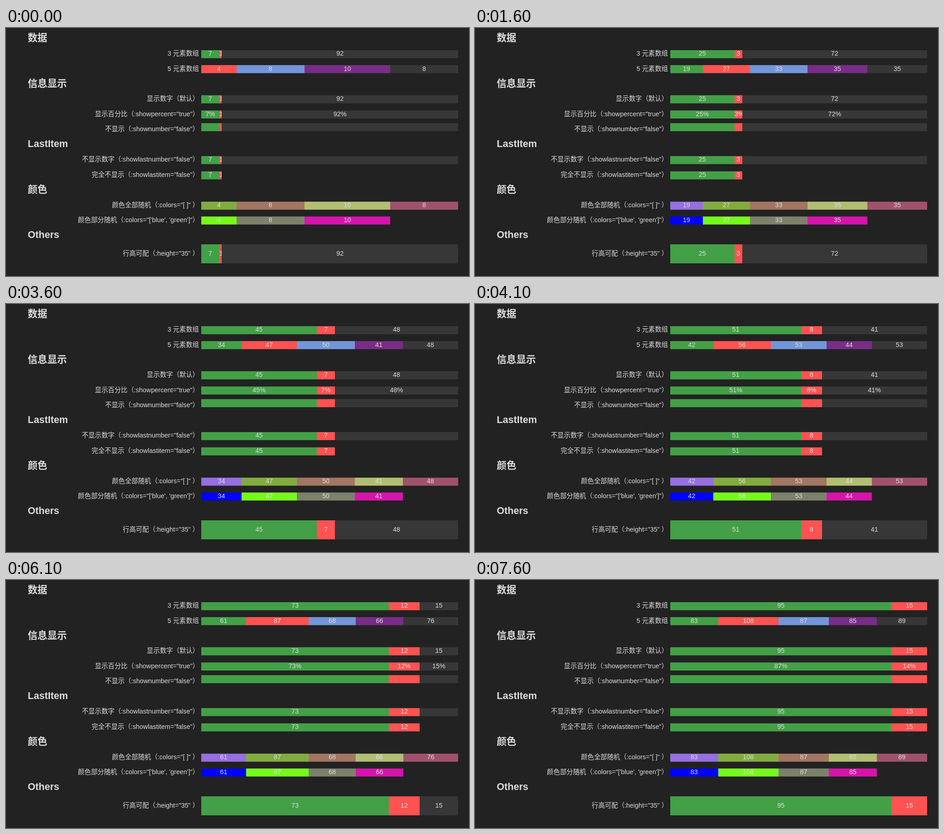
Recreate the animation shown at these times as an HTML page. Size 1022 by 548 pixels, loop 8000 ms.

```html
<!DOCTYPE html>
<html lang="zh-CN">
<head>
<meta charset="utf-8">
<title>Progress bars</title>
<style>
html, body { margin: 0; width: 100%; height: 100%; overflow: hidden; background: #222; }
#stage { display: block; }
.cell { overflow: hidden; }
text { font: 14.4px "Liberation Sans", Arial, "Noto Sans CJK SC", "Noto Sans CJK", sans-serif; fill: #ddd; white-space: pre; }
.head { font-size: 21.6px; font-weight: bold; }
.label { text-anchor: end; }
</style>
</head>
<body>
<svg id="stage" width="1022" height="548" viewBox="0 0 1022 548">
  <rect width="1022" height="548" fill="#222"/>
</svg>
<script>
const NS = "http://www.w3.org/2000/svg";
const LEFT = 431, WIDTH = 567, EM = 14.4, LOOP = 8000;
const stage = document.getElementById("stage");

const GREY = "#373737";
const BASE = ["#43a047", "#ff5252", "#7296d8", "#782d86"];
const RANDOM = ["#966fe0", "#82ab3f", "#a27663", "#b2be72", "#a0526d"];
const MIXED = ["#0000ff", "#76fa1e", "#7c816b", "#d515aa"];

const heads = [["数据", 29], ["信息显示", 130], ["LastItem", 263], ["颜色", 364], ["Others", 464]];

// y: top of the bar; base: text baseline
const rows = [
  { label: "3 元素数组", y: 49, base: 61 },
  { label: "5 元素数组", y: 82, base: 95, five: true },
  { label: "显示数字（默认）", y: 148.6, base: 161 },
  { label: '显示百分比（:showpercent="true"）', y: 182.3, base: 195, percent: true },
  { label: '不显示（:shownumber="false"）', y: 210.2, base: 228, noText: true },
  { label: '不显示数字（:showlastnumber="false"）', y: 283, base: 295, noLastText: true },
  { label: '完全不显示（:showlastitem="false"）', y: 316.8, base: 329, noLast: true },
  { label: '颜色全部随机（:colors="[ ]" ）', y: 383.8, base: 396, five: true, colors: RANDOM },
  { label: "颜色部分随机（:colors=\"['blue', 'green']\"）", y: 416.5, base: 429, five: true, colors: MIXED, noLast: true },
  { label: '行高可配（:height="35" ）', y: 478, base: 503, h: 42 }
];

// Key points: step, first value of the short array, values of the long one
const keys = [
  [0, 7, 0, 4, 8, 10, 8],
  [1, 12, 9, 13, 17, 17, 10],
  [4, 25, 19, 27, 33, 35, 35],
  [6, 32, 27, 34, 45, 37, 40],
  [8, 45, 34, 47, 50, 41, 48],
  [11, 62, 57, 74, 59, 51, 63],
  [13, 73, 61, 87, 68, 66, 76],
  [16, 95, 83, 108, 87, 85, 89]
];

function valuesAt(step) {
  const i = Math.max(1, keys.findIndex(k => k[0] >= step));
  const from = keys[i - 1], to = keys[i];
  const f = (step - from[0]) / (to[0] - from[0]);
  const [, first, ...five] = from.map((v, j) => Math.round(v + (to[j] - v) * f));
  const second = Math.max(1, step - 1);
  return { three: [first, second, Math.max(0, 100 - first - second)], five };
}

function set(el, attrs) {
  for (const k in attrs) el.setAttribute(k, attrs[k]);
}

function make(parent, tag, attrs, text) {
  const el = document.createElementNS(NS, tag);
  set(el, attrs);
  if (text) el.textContent = text;
  parent.appendChild(el);
  return el;
}

for (const [text, y] of heads) make(stage, "text", { class: "head", x: 48, y }, text);

for (const row of rows) {
  make(stage, "text", { class: "label", x: 426, y: row.base }, row.label);
  const count = row.five ? 5 : 3;
  row.cells = Array.from({ length: count }, (_, i) => {
    const last = i === count - 1;
    const fill = row.colors ? row.colors[i] : last ? GREY : BASE[i];
    const box = make(stage, "svg", { class: "cell", y: row.y, height: row.h || 17.8 });
    // oversized, so that only the cell's clip shapes its edges
    make(box, "rect", { x: -1, y: -1, width: WIDTH + 2, height: 50, fill: fill || "none" });
    return {
      box,
      text: make(box, "text", { y: row.base - row.y }),
      hidden: last && row.noLast,
      blank: row.noText || (last && row.noLastText)
    };
  });
}

const textWidth = s => [...s].reduce((w, c) => w + (c === "%" ? 0.889 : 0.556) * EM, 0);

// Shares round up to whole percents, then shrink to fit the bar
function drawRow(row, values) {
  const total = values.reduce((a, b) => a + b);
  const shares = values.map(v => Math.ceil(v * 100 / total));
  const sum = shares.reduce((a, b) => a + b);
  let pos = LEFT;
  row.cells.forEach((cell, i) => {
    const w = shares[i] / sum * WIDTH;
    const x0 = Math.round(pos), x1 = Math.round(pos + w);
    const shown = w > 0 && !cell.hidden;
    set(cell.box, { x: x0, width: x1 - x0, display: shown ? "inline" : "none" });
    const label = cell.blank ? "" : row.percent ? shares[i] + "%" : String(values[i]);
    cell.text.textContent = label;
    cell.text.setAttribute("x", pos - x0 + Math.max(0, (w - textWidth(label)) / 2));
    pos += w;
  });
}

function stepAt(t) {
  if (t < 200) return 0;
  if (t < 700) return 1;
  if (t < 1100) return 2;
  return 3 + Math.floor((t - 1100) / 500);
}

let current = -1;
function draw(t) {
  const step = stepAt(t % LOOP);
  if (step === current) return;
  current = step;
  const { three, five } = valuesAt(step);
  for (const row of rows) drawRow(row, row.five ? five : three);
}

function tick() {
  draw(performance.now());
  requestAnimationFrame(tick);
}
tick();
</script>
</body>
</html>
```
